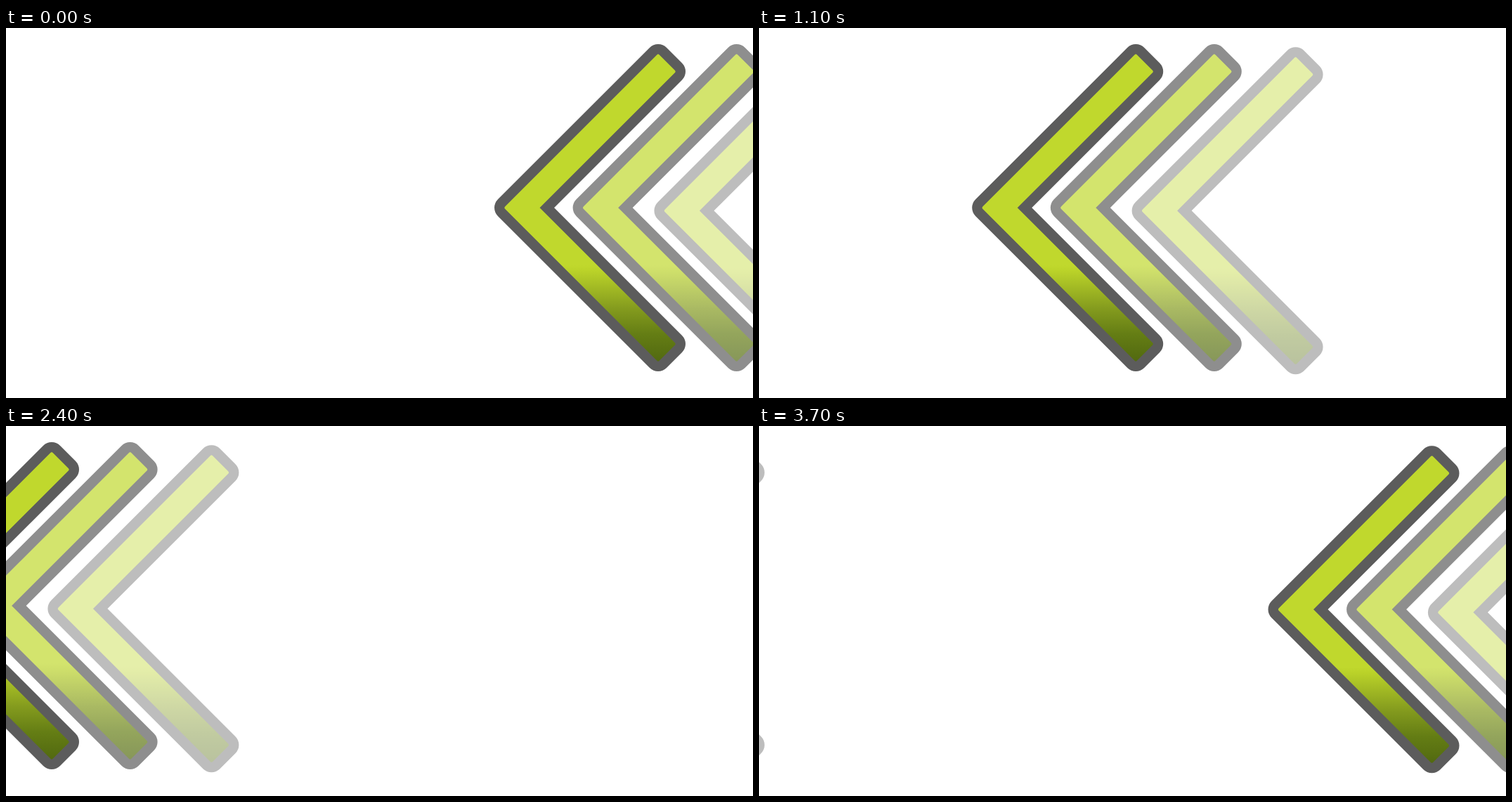
An HTML page that plays this animation: 1063x527 px, repeating every 3.8 s.

```html
<!DOCTYPE html>
<html lang="en">
<head>
<meta charset="utf-8">
<title>Moving chevrons</title>
<style>
  html, body { margin: 0; width: 100%; height: 100%; overflow: hidden; background: #fff; }
  svg { display: block; width: 1063px; height: 527px; }
</style>
</head>
<body>
<svg viewBox="0 0 1063 527">
  <defs>
    <linearGradient id="shade" gradientUnits="userSpaceOnUse" x1="0" y1="338" x2="0" y2="475">
      <stop offset="0" stop-color="#c0d82d"/>
      <stop offset=".06" stop-color="#bad229"/>
      <stop offset=".45" stop-color="#849b1e"/>
      <stop offset=".72" stop-color="#647d14"/>
      <stop offset="1" stop-color="#526910"/>
    </linearGradient>
    <path id="bone" d="M17 256 L233 40 L255 62 L61 256 L255 450 L233 472 Z" stroke-linejoin="round"/>
    <g id="chevron">
      <use href="#bone" fill="#5c5c5c" stroke="#5c5c5c" stroke-width="34"/>
      <use href="#bone" fill="url(#shade)" stroke="url(#shade)" stroke-width="5"/>
    </g>
    <g id="trio">
      <use href="#chevron"/>
      <use href="#chevron" x="111.6" opacity=".69"/>
      <use href="#chevron" x="227.4" y="4.2" opacity=".4"/>
    </g>
  </defs>
  <use id="leaving" href="#trio"/>
  <use id="entering" href="#trio"/>
</svg>
<script>
  const LOOP = 3800, STEP = 100;

  // [time in ms, x of the leading tip]
  const leavingPath = [
    [0, 695], [400, 542.2], [600, 468.5], [1100, 303.2], [1200, 271.5],
    [1500, 150.2], [1800, 34.5], [2400, -168], [2700, -267.5], [3700, -491.5]
  ];
  const enteringPath = [[2700, 1093.5], [3200, 909], [3700, 724.5]];

  function along(path, t) {
    if (t <= path[0][0]) return path[0][1];
    for (let i = 1; i < path.length; i++) {
      const [t0, x0] = path[i - 1], [t1, x1] = path[i];
      if (t <= t1) return x0 + (x1 - x0) * (t - t0) / (t1 - t0);
    }
    return path[path.length - 1][1];
  }

  const leaving = document.getElementById("leaving");
  const entering = document.getElementById("entering");
  const place = (el, x, y) => el.setAttribute("transform", `translate(${x} ${y})`);
  const start = performance.now();

  function draw() {
    const t = Math.floor((performance.now() - start) % LOOP / STEP) * STEP;
    place(leaving, along(leavingPath, t), 0);
    place(entering, along(enteringPath, t), 5.2);
    requestAnimationFrame(draw);
  }
  draw();
</script>
</body>
</html>
```
